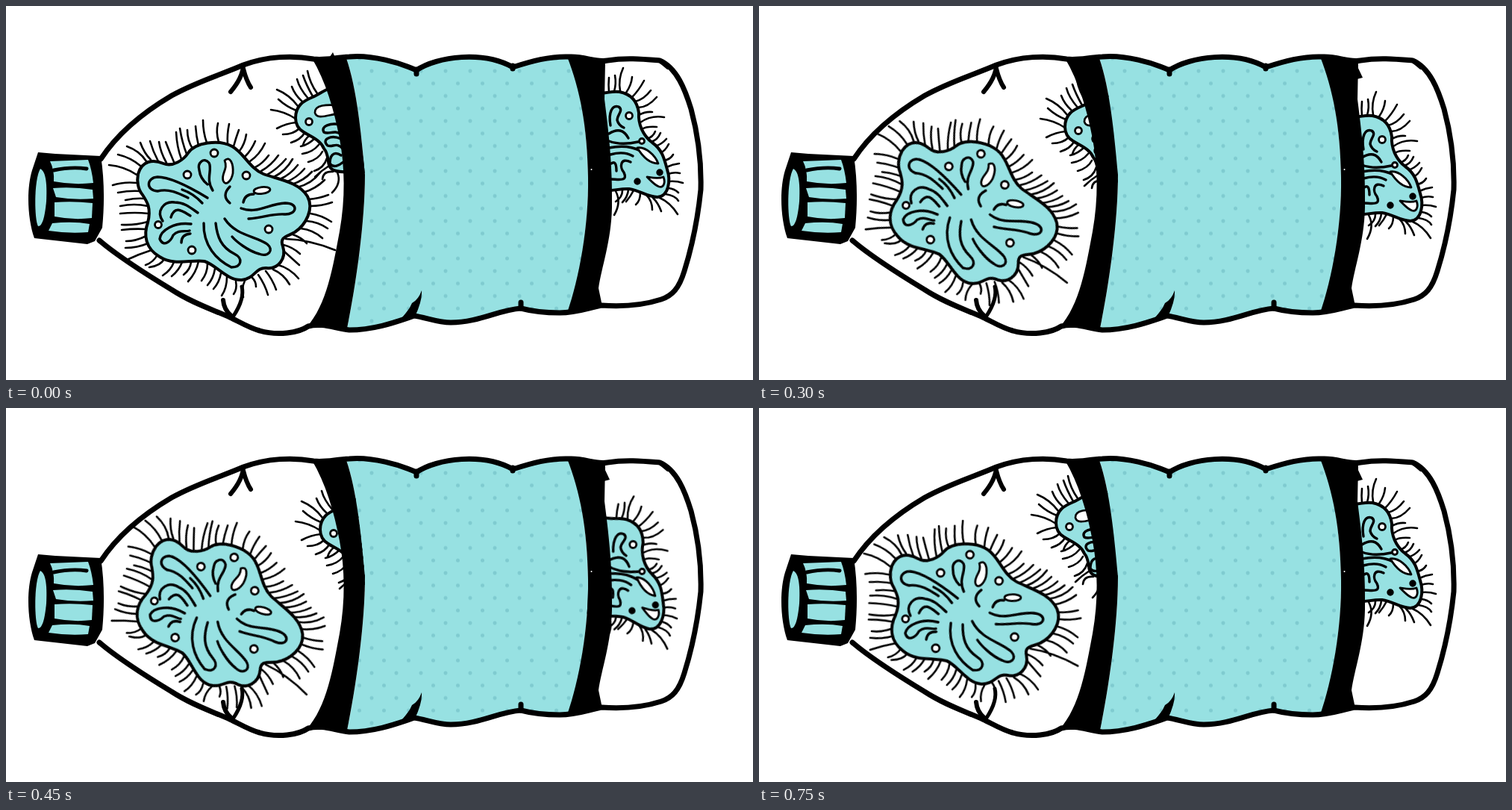
These frames come from a looping animation (1001 by 501 pixels, 900 ms). An HTML page without scripts:

```html
<!DOCTYPE html>
<html lang="en">
<head>
<meta charset="utf-8">
<title>Germs in a bottle</title>
<style>
  html, body { margin: 0; width: 100%; height: 100%; overflow: hidden; background: #fff; }
  svg { display: block; width: 100vw; height: 100vh; }
  path, ellipse, circle { stroke-linecap: round; stroke-linejoin: round; }
  .line { fill: none; stroke: #000; }
  .shell { stroke: #000; stroke-width: 7; }
  .crease { stroke-width: 6; }
  .aqua { fill: #97e1e2; }
  .white { fill: #fff; }
  .germ { stroke: #000; stroke-width: 3.4; fill: none; }
  .germ .body { fill: #97e1e2; stroke-width: 4; }
  .germ .hair { stroke-width: 2.6; }
  .germ .white { stroke-width: 2.8; }
  .germ .dot { fill: #000; }

  .germ, .rest, .start { animation: 900ms step-end infinite; }
  .big { animation-name: big; transform-origin: 274.8px 261.5px; }
  .back { animation-name: back; }
  .right { animation-name: right; transform-origin: 852px 196.5px; }
  .rest { animation-name: rest; }
  .start { animation-name: start; }

  @keyframes big {
    0%, 100% { transform: none; }
    16.667%, 83.333% { transform: translate(-4.3px, -1.5px) rotate(7.1deg); }
    33.333%, 66.667% { transform: translate(-.8px, -3.2px) rotate(17.5deg); }
    50% { transform: translate(1.5px, -3.8px) rotate(23.4deg); }
  }
  @keyframes back {
    0%, 100% { transform: none; }
    16.667%, 83.333% { transform: translate(10px, 4px); }
    33.333%, 66.667% { transform: translate(22px, 12px); }
    50% { transform: translate(33px, 13px); }
  }
  @keyframes right {
    0%, 100% { transform: none; }
    16.667%, 83.333% { transform: translate(0, 12px); }
    33.333%, 66.667% { transform: translate(0, 32px); }
    50% { transform: translate(-1.8px, 37.8px) rotate(8deg); }
  }
  @keyframes rest { 0%, 100% { opacity: 0; } 16.667% { opacity: 1; } }
  @keyframes start { 0%, 100% { opacity: 1; } 16.667% { opacity: 0; } }
</style>
</head>
<body>
<svg viewBox="0 0 1001 501">
  <defs>
    <pattern id="dots" x="482" y="79" width="33" height="33.5" patternUnits="userSpaceOnUse">
      <g fill="#7fcbd0">
        <circle cx="8" cy="8" r="2.5"/>
        <circle cx="24.5" cy="24.7" r="2.5"/>
      </g>
    </pattern>
    <path id="outline" d="M127 205C146 176 178 146 222 120C254 102 288 92 318 79C350 67 385 66 412 71
      C428 73 440 69 460 68C490 65 528 76 550 86C578 67 640 60 679 82C704 74 728 67 755 68
      C776 67 790 76 806 73C830 69 852 71 876 73C899 83 910 112 918 138C928 175 932 210 931 246
      C927 285 920 320 909 355C902 378 893 388 878 393C850 402 825 403 798 401C778 405 764 411 742 411
      C722 411 705 409 690 405C660 407 634 424 596 424C578 424 562 417 547 415C526 422 495 434 460 434
      C440 432 424 424 405 429C392 438 364 442 340 435C325 431 313 423 300 417C275 406 248 397 222 380C189 360 152 337 125 314"/>
    <path id="label" d="M456 70C490 66 528 76 550 86C578 67 640 60 679 82C704 74 728 69 754 69
      C769 112 779 160 780 230C781 295 768 365 755 411C735 412 710 410 690 405C660 407 634 424 596 424
      C578 424 562 417 547 415C526 422 495 434 457 432C469 373 481 290 481 226C476 170 470 110 456 70Z"/>
  </defs>

  <use href="#outline" class="white"/>

  <g class="germ big">
    <g class="hair">
      <path d="M176 237q-18 -2 -33 3M175 226q-16 -11 -37 -13M180 214q-13 -11 -30 -15M188 208q-9 -14 -26 -20M194 206q-9 -9 -14 -23M204 208q-7 -13 -11 -27M215 210q-8 -14 -10 -28M225 209q-6 -14 -11 -27M235 205q-6 -16 -7 -36M242 198q-6 -15 -9 -34M250 191q-7 -11 -7 -25M258 187q-3 -12 -4 -26M269 183q-5 -14 -5 -30M285 182q-4 -13 -1 -25M297 185q-1 -13 2 -27"/>
      <path d="M305 188q3 -11 7 -22M313 194q7 -9 9 -22M320 202q9 -9 14 -21M327 208q13 -9 20 -24M334 216q10 -5 18 -16M342 221q13 -7 23 -21M350 226q14 -8 25 -21M359 229q16 -8 25 -24M367 232q14 -6 24 -19M375 236q15 -6 25 -18M383 239q16 -5 27 -17M390 243q20 -5 31 -20M398 250q17 -5 29 -17M405 259q14 -1 27 -6M408 268q15 0 29 -5"/>
      <path d="M408 278q14 2 28 11M403 288q15 1 28 10M395 298q17 2 29 13M384 306q12 4 19 12M375 312q32 1 66 15M372 320q12 3 22 12M373 329q10 9 20 18M365 347q15 4 27 18M358 353q14 6 22 20M348 355q9 11 14 25M338 360q9 13 13 27M330 364q5 5 5 12M320 368q-5 11 -2 22M308 369q2 10 -3 17M296 363q0 15 -7 25"/>
      <path d="M288 358q-2 12 -10 21M280 352q-2 13 -10 22M270 345q0 13 -8 23M258 342q-3 15 -14 27M248 343q-1 10 -10 17M236 343q-4 11 -14 19M225 343q-4 11 -15 18M212 339q-5 9 -20 11M203 333q-5 10 -16 14M195 327q-16 5 -33 13M190 318q-14 6 -30 6M188 308q-14 7 -27 7M188 299q-16 -1 -33 1M190 289q-17 5 -35 4M191 278q-18 -2 -38 0M190 268q-18 -4 -37 0M186 258q-12 -1 -26 2M180 248q-14 -1 -30 2"/>
    </g>
    <path class="body" d="M177 225C182 207 197 205 211 211C224 216 238 206 244 197C253 183 285 178 303 188
      C319 197 326 217 345 225C363 232 392 235 404 255C413 272 402 293 387 303C377 309 366 309 371 322
      C376 338 365 353 349 351C334 350 334 365 316 367C296 368 282 347 266 342C249 339 226 349 206 336
      C187 325 184 307 190 290C195 271 189 262 183 253C177 246 175 235 177 225Z"/>
    <path d="M270 257C247 243 221 229 203 229C188 230 187 247 203 248C219 244 232 251 244 257
      M277 247C267 232 277 219 272 210C265 202 256 210 259 220C260 229 265 235 270 239
      M300 242Q288 254 300 264M318 263Q320 252 332 252
      M315 271C337 279 351 265 374 264C393 264 390 280 373 279C355 278 345 284 325 285"/>
    <path d="M293 285C308 308 335 308 350 319C360 327 351 337 339 332C324 328 308 315 303 309
      M265 291C264 321 282 340 302 350C316 350 318 338 306 332C288 323 283 309 281 291
      M210 288C201 275 211 261 226 263C239 263 247 270 257 277M221 283C226 266 237 275 247 281
      M248 292C225 289 207 301 206 312C211 324 221 315 224 307C231 299 240 303 246 301M235 317Q235 306 247 305M236 246Q251 251 263 264"/>
    <path class="white" d="M293 207C300 200 305 211 304 224C302 235 294 242 291 234C288 224 298 219 293 207Z"/>
    <ellipse class="white" cx="343" cy="247" rx="11" ry="4.5" transform="rotate(-7 343 247)"/>
    <g class="white">
      <circle cx="243" cy="226" r="5"/>
      <circle cx="279" cy="197" r="5"/>
      <circle cx="322" cy="227" r="5"/>
      <circle cx="352" cy="299" r="5"/>
      <circle cx="249" cy="327" r="5"/>
      <circle cx="204" cy="293" r="4.5"/>
    </g>
  </g>

  <g class="germ back">
    <path class="hair" d="M388 151q-15 -10 -33 -12M389 140q-13 -5 -24 -15M391 134q-11 -15 -28 -22M397 128q-10 -9 -14 -20M405 124q-12 -14 -15 -26M411 121q-9 -16 -13 -28M417 117q-10 -14 -13 -30M389 156q-13 1 -26 8M393 164q-8 8 -22 8M400 170q-5 9 -18 13M407 173q-7 6 -9 13M414 177q-9 9 -19 11M419 186q-8 10 -22 12M424 195q-5 10 -19 14M430 204q-4 13 -17 17M433 214q-11 7 -19 15M438 222q-13 -1 -14 10M444 223q6 14 -7 27"/>
    <path class="body" d="M388 150C388 133 399 127 411 122C424 117 434 103 460 110L480 222C461 222 450 224 439 220
      C428 215 435 201 426 191C421 179 408 175 399 169C392 165 388 159 388 150Z"/>
    <path class="white" d="M414 143C413 132 431 132 444 133L449 144C435 144 417 154 414 143Z"/>
    <circle class="white" cx="406" cy="155" r="4.5"/>
    <path d="M448 159C435 156 421 161 426 169C432 173 440 165 449 172M449 178C435 172 422 179 431 187C438 190 443 181 452 192M449 200C438 193 434 202 434 211C439 218 447 213 452 209"/>
  </g>

  <g class="germ right">
    <path class="hair" d="M808 116q-1 -11 0 -20M815 114q3 -10 1 -21M823 114q-3 -16 4 -31M831 116q7 -10 8 -21M839 122q9 -9 16 -22M843 128q12 -3 21 -15M847 136q13 0 25 -14M848 146q9 -5 18 -4M850 156q14 -10 32 -7M852 165q6 -4 20 -3M858 178q9 -2 12 -10M864 182q9 -2 13 -12M870 188q9 -3 15 -10M876 197q7 -2 12 -12M881 207q9 -1 13 -8M885 216q8 -4 17 -5M887 225q9 -3 16 -1M888 235q10 -1 19 2"/>
    <path class="hair" d="M888 244q8 1 13 6M884 252q13 2 17 9M876 257q14 6 24 22M867 257q7 7 11 18M858 253q8 8 8 20M850 250q0 11 -6 16M841 247q-4 8 -10 15M834 246q-1 10 -8 17M826 247q0 9 -9 15M817 248q8 15 -2 32"/>
    <path class="body" d="M785 116C805 119 809 113 822 115C838 118 846 128 848 143C847 158 853 173 866 183
      C879 192 882 204 886 219C891 234 888 255 873 256C859 256 850 247 835 245C819 244 808 251 785 245Z"/>
    <path d="M810 160C807 143 812 132 821 135C828 140 819 145 819 153Q821 160 828 163M808 171Q825 160 834 177M808 181Q824 187 847 182M808 190Q833 185 850 194M810 199Q828 194 840 201M837 209C823 202 822 216 828 223C834 236 820 232 810 232M811 211Q818 206 818 221"/>
    <path class="white" d="M846 190C857 188 870 200 874 211C864 211 855 205 846 190Z"/>
    <path class="white" d="M859 229C866 230 874 232 881 229C884 237 881 244 875 242C869 240 864 234 859 229Z"/>
    <circle class="white" cx="835" cy="147" r="4.5"/>
    <circle class="white" cx="852" cy="181" r="3.5"/>
    <circle class="dot" cx="876" cy="223" r="3"/>
    <circle class="dot" cx="846" cy="235" r="3"/>
  </g>

  <use href="#label" class="aqua"/>
  <use href="#label" fill="url(#dots)"/>
  <path d="M410 70L456 70C470 110 476 170 481 226C481 290 469 373 457 432L403 430C430 400 438 350 447 302
    C455 258 454 215 447 178C440 140 428 100 410 70Z"/>
  <path d="M752 68L803 74L802 125C807 165 813 210 812 270C811 315 798 350 794 378L799 402L752 411
    C768 365 781 295 780 230C779 160 769 112 752 68Z"/>
  <path class="rest" d="M800 77L809 96L801 98Z"/>
  <path class="start" d="M434 68L438 62L441 69Z"/>
  <circle class="white" cx="784.5" cy="219" r="1"/>

  <use href="#outline" class="line shell"/>
  <g class="line crease">
    <path d="M318 80Q317 96 301 115M318 84Q322 100 328 109M291 394Q292 407 302 415"/>
    <path d="M316 376Q320 392 305 415" stroke-width="5"/>
    <path d="M550 85V91M679 80V84M690 397V405" stroke-width="7"/>
  </g>
  <path d="M557 381Q558 395 548 416L531 417Q541 406 544 398Q553 393 557 381Z"/>
  <path d="M868 70L880 71L893 85L886 85Z"/>

  <path d="M43 196L66 198L127 201C132 232 132 266 129 297L119 315L109 319L38 311C29 286 27 246 35 220Z"/>
  <g class="aqua">
    <path d="M46 218C54 222 55 240 54 262C52 282 49 295 43 295C38 287 37 233 46 218Z"/>
    <path d="M59 208L110 206Q115 219 117 237Q90 240 64 235Q65 220 59 208Z"/>
    <path d="M63 244Q90 242 116 246L117 258Q90 260 67 256Z"/>
    <path d="M65 263Q90 261 116 264L115 284Q90 287 65 282Z"/>
    <path d="M62 291Q90 288 112 292L110 303Q83 305 57 301Z"/>
  </g>
  <path class="line" d="M64 220Q88 215 108 218" stroke-width="5"/>
</svg>
</body>
</html>
```
